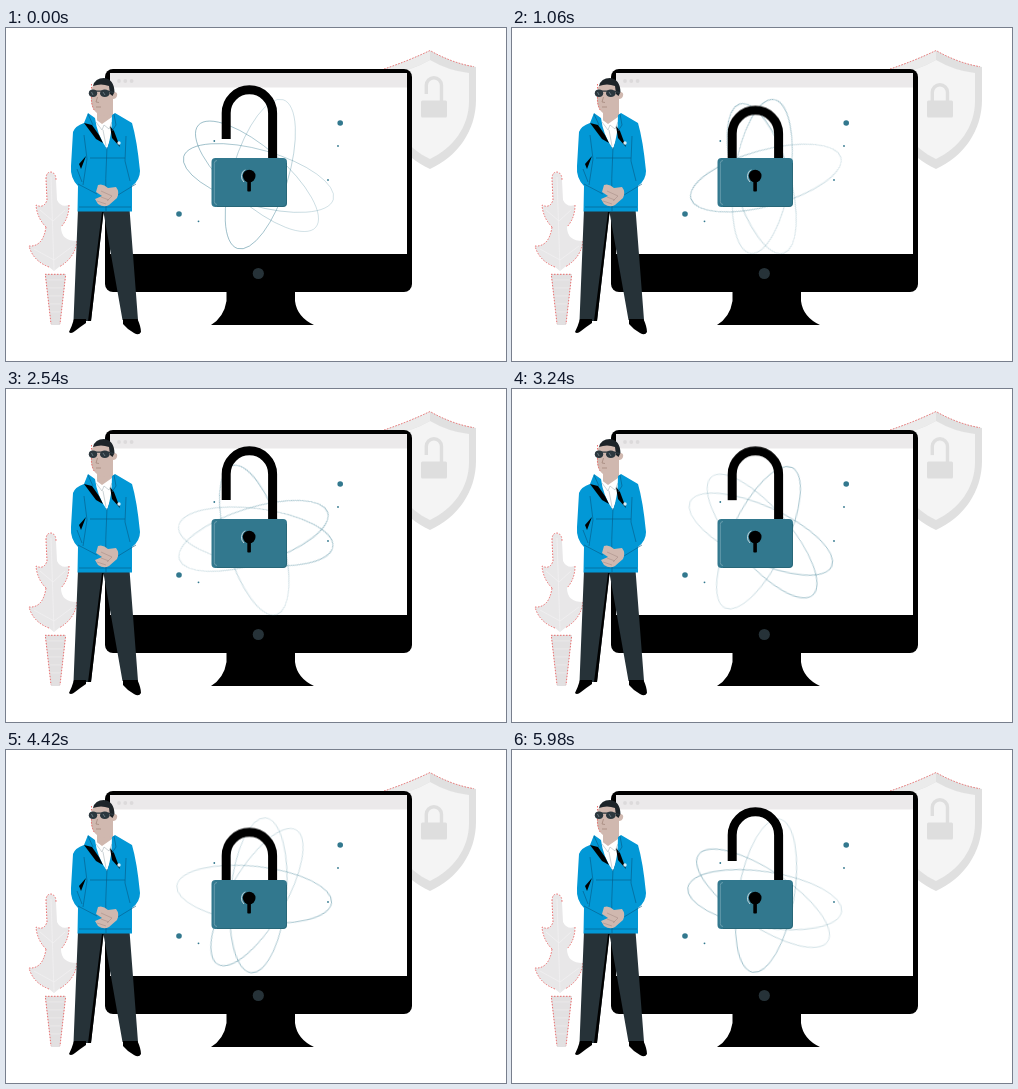
An HTML page that plays this animation: 500 px wide and 333 px high, repeating every 6000 ms.

```html
<!DOCTYPE html>
<html lang="en">
<head>
<meta charset="utf-8">
<title>Secure device</title>
<style>
  html, body { margin: 0; width: 100%; height: 100%; overflow: hidden; background: #fff; }
  svg { display: block; width: 500px; height: 333px; }
  #spin { transform-origin: 250.5px 147.7px; }
  .orbit { fill: none; stroke-width: .6; }
  .hem { fill: none; stroke: #ea5f5f; stroke-width: .9; stroke-dasharray: 1.5 1.5; }
  .seam { fill: none; stroke: #075a85; stroke-width: .6; }
  .teal { fill: #32788e; }
  .skin { fill: #d0b8af; }
</style>
</head>
<body>
<svg viewBox="0 0 500 333" xmlns="http://www.w3.org/2000/svg">
  <defs>
    <linearGradient id="fadeEnd" gradientUnits="userSpaceOnUse" x1="-78" y1="0" x2="78" y2="0">
      <stop offset="0" stop-color="#32788e" stop-opacity=".75"/>
      <stop offset="1" stop-color="#32788e" stop-opacity=".32"/>
    </linearGradient>
    <linearGradient id="fadeStart" gradientUnits="userSpaceOnUse" x1="78" y1="0" x2="-78" y2="0">
      <stop offset="0" stop-color="#32788e" stop-opacity=".75"/>
      <stop offset="1" stop-color="#32788e" stop-opacity=".32"/>
    </linearGradient>
  </defs>

  <g id="shield">
    <path fill="#e0e0e0" d="M424 22.500Q446 35 470 39V72C470 103 451 129 424 141C397 129 378 103 378 72V41Q402 33 424 22.500Z"/>
    <path fill="#f4f4f4" d="M424 32Q443 43 463 45V73C463 99 447 120 424 131C401 120 385 99 385 73V45Q405 43 424 32Z"/>
    <path fill="#ebebeb" d="M424 22.500V32Q405 43 385 45V73H378V41Q402 33 424 22.500Z"/>
    <path class="hem" d="M378 41Q402 33 424 22.500Q446 35 468 38.700"/>
    <path class="hatch" fill="none" stroke="#dedede" stroke-width="3.400" d="M420.300 66V57.300A7.600 7.600 0 0 1 435.500 57.300V75"/>
    <rect x="415" y="72.500" width="26" height="17" rx="1.500" fill="#dedede"/>
  </g>

  <g id="monitor">
    <rect x="99" y="41" width="307" height="223" rx="8"/>
    <path d="M220.500 262H289V273Q291 289 308 297H205Q218 289 220.500 273Z"/>
    <rect x="104" y="45" width="297" height="181" fill="#fff"/>
    <rect x="104" y="45" width="297" height="14.500" fill="#ebe9ea"/>
    <g fill="#dcdadb">
      <circle cx="113" cy="53" r="1.900"/><circle cx="119.300" cy="53" r="1.900"/><circle cx="125.600" cy="53" r="1.900"/>
    </g>
    <circle cx="252.300" cy="245.500" r="5.600" fill="#263238"/>
  </g>

  <g id="spin"></g>
  <g class="teal">
    <circle cx="334.200" cy="95" r="2.800"/><circle cx="173" cy="186" r="2.800"/>
    <circle cx="208.300" cy="113" r=".9"/><circle cx="332" cy="118" r=".9"/>
    <circle cx="322" cy="152" r=".9"/><circle cx="192.500" cy="193.300" r=".9"/>
  </g>

  <g id="lock">
    <path class="shackle" fill="none" stroke="#000" stroke-width="9" d="M220.200 111V85A23.200 23.200 0 0 1 266.600 85V136"/>
    <rect class="teal" x="205.500" y="130" width="75.500" height="49" rx="4"/>
    <path fill="none" stroke="#74a5b4" stroke-width=".8" d="M211 132.500Q208.300 132.500 208.300 135.500V173.500Q208.300 176.500 211 176.500"/>
    <path fill="none" stroke="#25606f" stroke-width=".7" d="M211 178.500H277Q280.500 178.500 280.500 175V135"/>
    <path fill="none" stroke="#d5e5ea" stroke-width=".9" d="M239 141.700A7.800 7.800 0 0 0 238 154"/>
    <circle cx="243.200" cy="148" r="6.300"/>
    <rect x="241.300" y="150" width="3.600" height="13.500" rx=".8"/>
  </g>

  <g id="plant">
    <path fill="#e8e7e8" d="M40 151Q40 144 45 144Q50 145 50 152L51 172Q55 180 63 177Q63 190 55 199Q55 213 71 213Q69 230 53 239L48 243L43 239Q27 233 23 218Q37 219 40 199Q31 190 30 177Q38 181 41 172Z"/>
    <path fill="none" stroke="#f1f0f1" stroke-width=".8" d="M45 149L48 242M34 182L47 193L59 182M28 221L48 232L67 218"/>
    <path class="hem" d="M41 172L40 151Q40 144 45 144Q50 145 50 152M40 199Q31 190 30 177Q38 181 41 172M43 239Q27 233 23 218Q37 219 40 199M63 177Q63 190 55 199M71 213Q69 230 53 239"/>
    <path fill="#e2e0e1" d="M39 246H60L54 297H45Z"/>
    <path fill="none" stroke="#eae8e9" d="M40 252H59M41 260H58M42 268H57M43 276H56M44 284H55"/>
    <path class="hem" d="M39 246.300H60M39.500 248L45 296M59.500 248L54 296"/>
  </g>

  <g id="guard">
    <path fill="#263238" d="M72 181H98L85 293H67.500ZM97 181H123.500L132 292H116.500L98 187Z"/>
    <path d="M96 184H97.500L85 293H82ZM68 291H80V295Q74 299 69 303Q65 306.500 63 304Q66 298 68 291ZM117 291H131.500Q135 299 135 304Q133 308 128 305Q121 301 117 296Z"/>
    <path class="skin" d="M91 80H107V92L98 104L91 95Z"/>
    <path fill="#fff" d="M88 90L96 96L106 89L108 100L101 122L91 108Z"/>
    <path fill="none" stroke="#aab6bb" stroke-width=".6" d="M90 94L96 102L98 97L103 101L106 94M97 102L100 118"/>
    <path fill="#0298d6" d="M82 85L89 90Q91 107 101 121Q106 108 106 87L109 85L126 95Q131 112 134 143Q134 152 126 158V183.500H71.500L72 158Q64 150 65 138L67 104Q69 98 78 95Z"/>
    <path d="M78 95L86 97L93 107L97 115L90 111ZM104 98L108 103L114 119L106 110ZM73 136L80 128L75 141Z"/>
    <path class="seam" d="M82 86L87 97M108 86L110 97L106 103M101 119Q99 150 100 183M84 130H119M78 107L81 131L77 157M120 108L119 133L124 153M73 179H125M71 141L76 154"/>
    <circle cx="113" cy="115" r="1.700" fill="#d9eff8"/>
    <path class="seam" d="M72 156L91 166M130 156L112 167"/>
    <path class="skin" d="M92 157Q97 155 102 160L110 159Q114 164 111 170L103 177Q98 180 92 176L89 171L96 168L90 164Z"/>
    <path fill="none" stroke="#a88f88" stroke-width=".6" d="M95 163L106 168L101 173M95 169L103 172M91 173L100 176"/>
    <path class="skin" d="M86 60Q88 53 104 53L108 59L108 64Q112 64 111 68Q110 71 107 71V86Q100 89 94 87Q88 84 86 78Q84 70 86 60Z"/>
    <path fill="#1d2429" d="M87 58Q89 50 98 50Q108 51 108.500 64L106.500 68L104 66L103 58Q95 55 87 58Z"/>
    <g fill="#2b373e">
      <ellipse cx="87" cy="65.200" rx="4.200" ry="3.700"/><ellipse cx="98.800" cy="65.200" rx="4.800" ry="3.800"/>
      <path d="M89 62.500H96V63.700H89ZM102 62.500L108 64V65.200L102 64Z"/>
    </g>
    <path fill="none" stroke="#77878e" stroke-width=".8" d="M85.500 64L87 67M97 64L99 67"/>
    <path fill="none" stroke="#a08378" stroke-width=".7" d="M91.500 69L90 74L93 74.500M90 79L95 79"/>
    <path class="hem" d="M85.500 69Q85 76 88 82M85.500 56V61"/>
  </g>
</svg>
<script>
  const LOOP = 6000;
  const HOLD = 100;
  const NS = "http://www.w3.org/2000/svg";

  // centre x, centre y, angle, fading end
  const orbits = [
    [254.3, 146.1, 107, "fadeStart"],
    [252.5, 150.0, 16, "fadeEnd"],
    [251.0, 148.3, 41, "fadeEnd"]
  ];
  const spin = document.getElementById("spin");
  for (const [x, y, angle, fade] of orbits) {
    const ring = document.createElementNS(NS, "ellipse");
    ring.setAttribute("class", "orbit");
    ring.setAttribute("rx", 77.8);
    ring.setAttribute("ry", 28);
    ring.setAttribute("stroke", `url(#${fade})`);
    ring.setAttribute("transform", `translate(${x} ${y}) rotate(${angle})`);
    spin.append(ring);
  }

  const turn = (LOOP - HOLD) * 360 / LOOP;
  spin.animate([
    { transform: "rotate(0deg)", offset: 0 },
    { transform: "rotate(0deg)", offset: HOLD / LOOP },
    { transform: `rotate(${turn}deg)`, offset: 1 }
  ], { duration: LOOP, iterations: Infinity });

  // Each lock closes, rests, then opens again twice per loop.
  const steps = [[0, 0], [200, 0], [1000, 1], [1400, 1], [2300, 0], [3000, 0]];
  function latch(selector, drop) {
    const frames = steps.map(([ms, closed]) => ({
      offset: ms / 3000,
      transform: `translateY(${closed * drop}px)`,
      easing: "cubic-bezier(.333, 0, .667, 1)"
    }));
    document.querySelector(selector).animate(frames, { duration: LOOP / 2, iterations: Infinity });
  }
  latch(".shackle", 20.5);
  latch(".hatch", 7);
</script>
</body>
</html>
```
